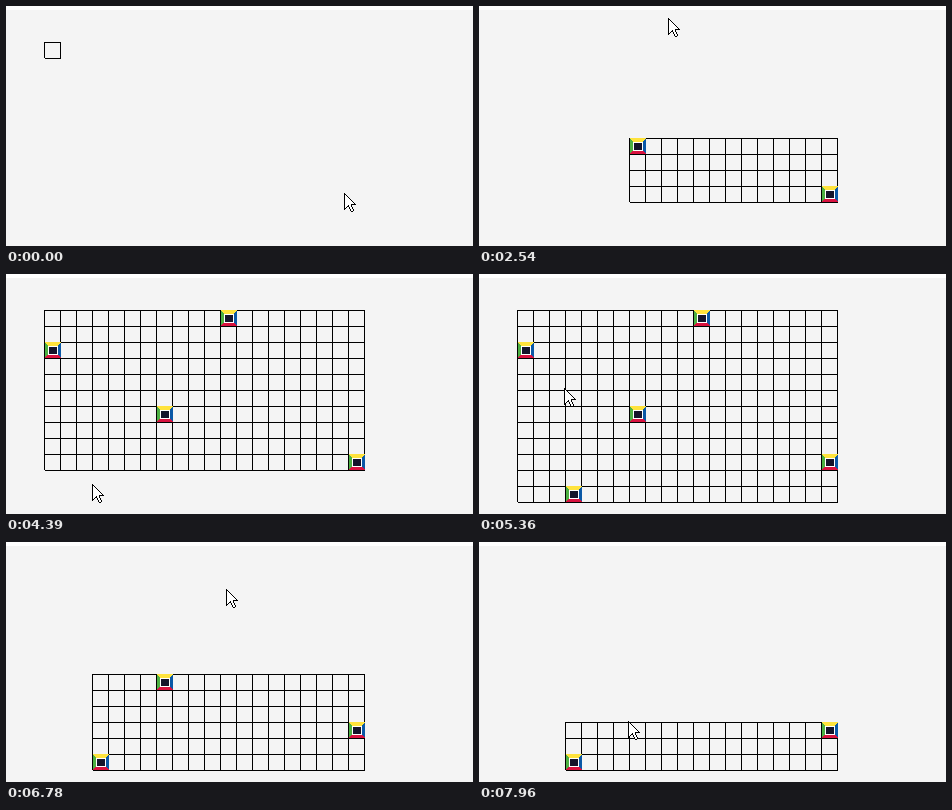
An HTML page with a canvas for the animation above (8 s loop, 467 by 240 pixels).

```html
<!DOCTYPE html>
<html lang="en">
<head>
<meta charset="utf-8">
<title>Growing tile grid</title>
<style>
  html, body { margin: 0; width: 100%; height: 100%; overflow: hidden; background: #f4f4f4; }
  canvas { display: block; }
</style>
</head>
<body>
<canvas id="stage" width="467" height="240"></canvas>
<script>
const ctx = document.getElementById('stage').getContext('2d');
const LOOP = 8000, STEP = 120, CELL = 16, LEFT = 38, TOP = 36;
const PAPER = '#f4f4f4', INK = '#000', DARK = '#14142a';

// The pointer glides to each stop; a click toggles the tile under its tip.
const stops = [
  { leave: 0, arrive: 0, x: 338, y: 187 },
  { leave: 120, arrive: 120, x: 345, y: 195, click: 770 },
  { leave: 1170, arrive: 1470, x: 163, y: 144, click: 2150 },
  { leave: 2420, arrive: 2540, x: 189, y: 12 },
  { leave: 2690, arrive: 2690, x: 216, y: 37, click: 2970 },
  { leave: 3120, arrive: 3360, x: 45, y: 75, click: 3640 },
  { leave: 3760, arrive: 4510, x: 87, y: 213, click: 4510 },
  { leave: 4820, arrive: 5060, x: 131, y: 151 },
  { leave: 5360, arrive: 5360, x: 85, y: 114 },
  { leave: 5510, arrive: 5780, x: 48, y: 76, click: 6090 },
  { leave: 6240, arrive: 6780, x: 220, y: 47, click: 6780 },
  { leave: 6900, arrive: 7530, x: 160, y: 137, click: 7810 },
  { leave: 7960, arrive: 7960, x: 149, y: 179 },
];

const easeOut = u => 1 - (1 - u) ** 2;

function rect(color, x, y, w, h) {
  ctx.fillStyle = color;
  ctx.fillRect(x, y, w, h);
}

function tilesAt(t) {
  const tiles = new Map();
  for (const { x, y, click } of stops) {
    if (!(click <= t)) continue;
    const col = Math.floor((x - LEFT) / CELL), row = Math.floor((y - TOP) / CELL);
    const key = col + ',' + row;
    if (!tiles.delete(key)) tiles.set(key, { col, row });
  }
  return [...tiles.values()];
}

// The pointer is redrawn only once per STEP, so glides advance in jumps.
function pointerAt(t) {
  const i = stops.findLastIndex(s => s.leave <= t);
  const to = stops[i], from = stops[i - 1] || to;
  const count = Math.floor((to.arrive - to.leave) / STEP) + 1;
  const done = Math.floor((t - to.leave) / STEP) + 1;
  const u = easeOut(Math.min(1, done / count));
  return [Math.round(from.x + (to.x - from.x) * u), Math.round(from.y + (to.y - from.y) * u)];
}

// The grid spans the bounding box of all tiles, or one cell when there are none.
function drawGrid(tiles) {
  const cells = tiles.length ? tiles : [{ col: 0, row: 0 }];
  const cols = cells.map(c => c.col), rows = cells.map(c => c.row);
  const x0 = LEFT + Math.min(...cols) * CELL, x1 = LEFT + (Math.max(...cols) + 1) * CELL;
  const y0 = TOP + Math.min(...rows) * CELL, y1 = TOP + (Math.max(...rows) + 1) * CELL;
  for (let x = x0; x <= x1; x += CELL) rect(INK, x, y0, 1, y1 - y0 + 1);
  for (let y = y0; y <= y1; y += CELL) rect(INK, x0, y, x1 - x0 + 1, 1);
  rect(PAPER, x0, y1, 1, 1);
}

function drawTile({ col, row }) {
  const x = LEFT + col * CELL + 1, y = TOP + row * CELL;
  rect('#4db043', x, y, 8, 16);
  rect('#0a58a6', x + 8, y, 8, 16);
  for (let i = 0; i < 4; i++) {
    rect('#ffe33c', x + i, y + i, 16 - 2 * i, 1);
    rect('#d8123f', x + i, y + 15 - i, 16 - 2 * i, 1);
  }
  rect('#fff', x + 3, y + 4, 10, 9);
  rect(DARK, x + 4, y + 5, 8, 7);
}

// One pixel row: ink at both ends, white between.
function span(x, y, width) {
  rect(INK, x, y, width, 1);
  if (width > 2) rect('#fff', x + 1, y, width - 2, 1);
}

function drawPointer([x, y]) {
  for (let i = 0; i < 12; i++) span(x, y + i, i + 1);
  rect(INK, x + 7, y + 11, 5, 1);
  for (let i = 0; i < 6; i++) {
    span(x + 4 + (i >> 1), y + 12 + i, 4);
    if (i < 5) span(x, y + 12 + i, 5 - i);
  }
  rect(INK, x + 7, y + 18, 2, 1);
}

function render(t) {
  const tiles = tilesAt(t);
  rect(PAPER, 0, 0, 467, 240);
  rect('#fff', 0, 0, 467, 4);
  drawGrid(tiles);
  tiles.forEach(drawTile);
  drawPointer(pointerAt(t));
}

const start = performance.now();
function tick() {
  render(Math.max(0, performance.now() - start) % LOOP);
  requestAnimationFrame(tick);
}
tick();
</script>
</body>
</html>
```
